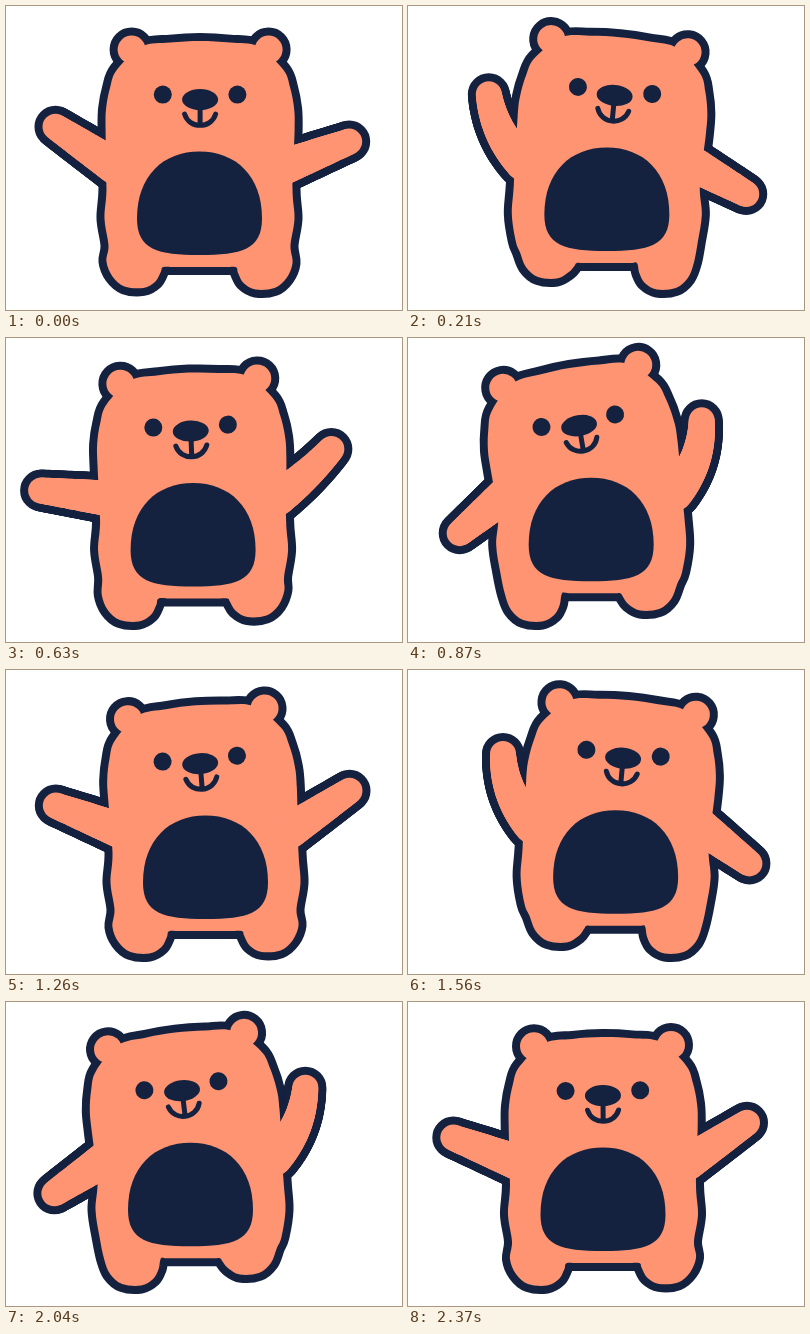
Animation, 396 px wide and 304 px high, one loop 2400 ms. Source, as an HTML page with a canvas:

```html
<!DOCTYPE html>
<html lang="en">
<head>
<meta charset="utf-8">
<title>Waving bear</title>
<style>
html, body { margin: 0; width: 100%; height: 100%; overflow: hidden; background: #fff; }
canvas { display: block; }
</style>
</head>
<body>
<canvas id="stage" width="396" height="304"></canvas>
<script>
const ctx = document.getElementById('stage').getContext('2d');
const ORANGE = '#ff9473', NAVY = '#14213f';
const LOOP = 2400, STEP = 30, LINE = 8;

// time, sway (+1 left arm up, -1 right arm up), body x, head tilt in degrees
const KEYS = [
  [0, .12, 193.5, 0], [120, .6, 197, 3], [280, 1, 199.5, 7], [450, .78, 197, 8],
  [540, .25, 191.5, 4], [660, -.5, 186, -4], [800, -.98, 183.5, -9], [900, -1.02, 183.5, -9.6],
  [1080, -.65, 188.5, -8.5], [1260, -.12, 199.5, -4.5], [1400, .6, 205, 1], [1500, .93, 207.5, 4],
  [1590, .97, 207, 5.5], [1700, .55, 201, 4.5], [1800, -.1, 193, 0], [1920, -.75, 186.5, -5],
  [2040, -.95, 184.5, -6.9], [2200, -.7, 187.5, -5], [2370, -.12, 195, -.5]
];

function key(i) {
  const n = KEYS.length, wrap = Math.floor(i / n), k = KEYS[i - wrap * n];
  return [k[0] + wrap * LOOP, ...k.slice(1)];
}

// Smooth periodic interpolation through the keys
function sample(t) {
  let i = KEYS.length - 1;
  while (KEYS[i][0] > t) i--;
  const [a, b, c, d] = [i - 1, i, i + 1, i + 2].map(key);
  const span = c[0] - b[0], u = (t - b[0]) / span;
  return [1, 2, 3].map(j => {
    const m0 = (c[j] - a[j]) / (c[0] - a[0]) * span;
    const m1 = (d[j] - b[j]) / (d[0] - b[0]) * span;
    const diff = c[j] - b[j];
    return b[j] + u * (m0 + u * (3 * diff - 2 * m0 - m1 + u * (m0 + m1 - 2 * diff)));
  });
}

function smoothPath(pts) {
  const path = new Path2D(), n = pts.length, at = i => pts[(i + n) % n];
  path.moveTo(...pts[0]);
  for (let i = 0; i < n; i++) {
    const [a, b, c, d] = [at(i - 1), at(i), at(i + 1), at(i + 2)];
    path.bezierCurveTo(
      b[0] + (c[0] - a[0]) / 6, b[1] + (c[1] - a[1]) / 6,
      c[0] - (d[0] - b[0]) / 6, c[1] - (d[1] - b[1]) / 6, c[0], c[1]);
  }
  path.closePath();
  return path;
}

function disc(x, y, rx, ry = rx) {
  const path = new Path2D();
  path.ellipse(x, y, rx, ry, 0, 0, Math.PI * 2);
  return path;
}

function pose(t) {
  const [sway, x, degrees] = sample(t);
  const y = 197.7 - 5.5 * sway * sway;
  return { sway, x, y, tilt: degrees * Math.PI / 180, headX: x + .6 + 1.4 * degrees, headY: y - 109 };
}

// Torso half-profiles run from the crown down to the crotch
const HEAD_SIDE = [[30, -52], [58, -48], [83, -25], [90, -7], [94, 14], [94.5, 36]];
const HIP_SIDE = [[93, -15], [95, 15], [91, 42]];
const FOOT = [[29, 257], [23, 272], [11, 282], [-8, 283.5], [-20, 277], [-25.5, 267], [-28, 260]];

function torso(p) {
  const cos = Math.cos(p.tilt), sin = Math.sin(p.tilt);
  const fromHead = (x, y) => [p.headX + x * cos - y * sin, p.headY + x * sin + y * cos];
  const side = dir => {
    const lift = 11 * Math.min(1, Math.max(0, -dir * p.sway * 1.2));
    const footX = p.x + dir * (65 - 8 * Math.min(1, Math.abs(p.sway)));
    const crotch = p.y + 63.5;
    const foot = FOOT.map(([x, y], i) => [
      footX + dir * x,
      i === 6 ? crotch : Math.max(y - lift, i === 5 ? crotch + 3 : 0)
    ]);
    return [
      ...HEAD_SIDE.map(([x, y]) => fromHead(dir * x, y)),
      ...HIP_SIDE.map(([x, y]) => [p.x + dir * x, p.y + y]),
      ...foot,
      [p.x + dir * 22, crotch]
    ];
  };
  return smoothPath([fromHead(0, -53.5), ...side(1), ...side(-1).reverse()]);
}

function armDiscs(p, dir) {
  const raise = -dir * p.sway;
  const degrees = 29 + raise * (raise > 0 ? 39 : 66);
  const angle = degrees * Math.PI / 180, length = 68 + .14 * degrees;
  const sx = p.x + dir * 83.5, sy = p.y - 36.5;
  const dx = dir * Math.cos(angle), dy = -Math.sin(angle);
  const bend = Math.max(0, -dy * length - 40) * .45;
  const cx = sx + dx * length / 2 - dir * dy * bend;
  const cy = sy + dy * length / 2 + dir * dx * bend;
  const hx = sx + dx * length, hy = sy + dy * length;
  return Array.from({ length: 41 }, (_, i) => {
    const u = i / 40, v = 1 - u;
    return disc(v * v * sx + 2 * u * v * cx + u * u * hx,
                v * v * sy + 2 * u * v * cy + u * u * hy, 18 - 5 * u);
  });
}

function inHead(p, draw) {
  ctx.save();
  ctx.translate(p.headX, p.headY);
  ctx.rotate(p.tilt);
  draw();
  ctx.restore();
}

function drawFace() {
  ctx.fillStyle = ctx.strokeStyle = NAVY;
  for (const x of [-37.3, 37.3]) ctx.fill(disc(x, 0, 9));
  ctx.fill(disc(0, 5, 18, 10.5));
  ctx.lineWidth = 5;
  ctx.beginPath();
  ctx.moveTo(0, 12);
  ctx.lineTo(0, 30);
  ctx.moveTo(-15.5, 19.5);
  ctx.bezierCurveTo(-11, 34.5, 11, 34.5, 15.5, 19.5);
  ctx.stroke();
}

function drawBelly(p) {
  ctx.save();
  ctx.translate(p.x, p.y);
  ctx.fillStyle = NAVY;
  ctx.beginPath();
  ctx.moveTo(-62.5, 15);
  ctx.bezierCurveTo(-62.5, -28, -36, -52, 0, -52);
  ctx.bezierCurveTo(36, -52, 62.5, -28, 62.5, 15);
  ctx.bezierCurveTo(62.5, 46, 42, 51.5, 0, 51.5);
  ctx.bezierCurveTo(-42, 51.5, -62.5, 46, -62.5, 15);
  ctx.fill();
  ctx.restore();
}

function draw(t) {
  const p = pose(t);
  const parts = [torso(p), ...armDiscs(p, -1), ...armDiscs(p, 1)];
  const ears = [disc(-68.5, -45, 14), disc(68.5, -45, 14)];

  ctx.fillStyle = '#fff';
  ctx.fillRect(0, 0, 396, 304);
  ctx.lineJoin = ctx.lineCap = 'round';
  ctx.lineWidth = LINE * 2;
  ctx.strokeStyle = NAVY;
  ctx.fillStyle = ORANGE;

  // All outlines first, then all fills, so the parts merge into one silhouette
  const outline = path => ctx.stroke(path), fill = path => ctx.fill(path);
  for (const paint of [outline, fill]) {
    parts.forEach(paint);
    inHead(p, () => ears.forEach(paint));
  }
  drawBelly(p);
  inHead(p, drawFace);
}

const start = performance.now();
function frame() {
  const t = (performance.now() - start) % LOOP;
  draw(Math.floor(t / STEP) * STEP);
  requestAnimationFrame(frame);
}
frame();
</script>
</body>
</html>
```
